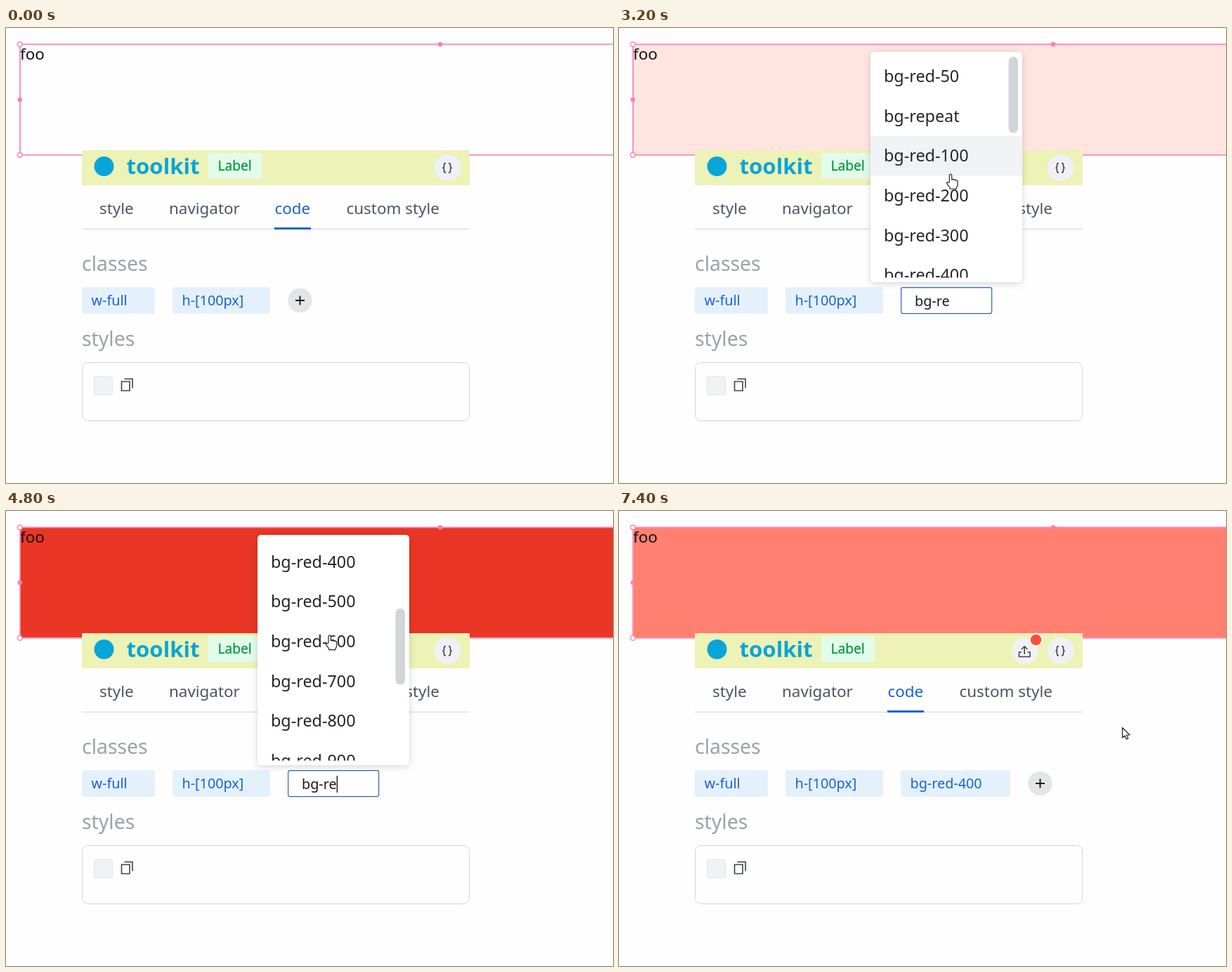
An HTML page for the animation above (7.46 s loop, 864 px wide and 648 px high).

```html
<!DOCTYPE html>
<html lang="en">
<head>
<meta charset="utf-8">
<title>Class editor</title>
<style>
  html, body { margin: 0; width: 100%; height: 100%; overflow: hidden; background: #fefefe; }
  svg { display: block; width: 864px; height: 648px; }
  text { font-family: "Noto Sans", "Open Sans", sans-serif; white-space: pre; }
  .tab { font-size: 22.4px; fill: #4d5566; }
  .head { font-size: 28.4px; fill: #9ca1ab; }
  .chip rect { fill: #e4f1fd; }
  .chip text { font-size: 19.8px; fill: #1762d8; }
  .chip path { stroke: #1762d8; stroke-width: 1.6; }
  .round { fill: #f0f1f4; }
  .icon { fill: none; stroke: #3d424d; stroke-width: 1.6; }
  .item { font-size: 23.35px; fill: #23252b; }
  .cursor { fill: #fff; stroke: #222; stroke-width: 1.2; stroke-linejoin: round; }
  #popup { filter: drop-shadow(0 2px 5px rgba(0, 0, 0, .16)); }
</style>
</head>
<body>
<svg viewBox="0 0 864 648">
  <defs>
    <clipPath id="view"><rect x="358" y="39" width="216" height="316.5"/></clipPath>
    <g id="cross"><path d="M-5.5-5.5 5.5 5.5M5.5-5.5-5.5 5.5"/></g>
    <g id="add">
      <circle r="17.2" fill="#e4e5e9"/>
      <path d="M-6.5 0H6.5M0-6.5V6.5" stroke="#15171b" stroke-width="1.9"/>
    </g>
  </defs>

  <rect id="fill" x="20" y="23" width="860" height="158"/>
  <text x="20" y="45" font-size="22.5" fill="#111">foo</text>
  <rect x="20" y="23.3" width="860" height="157.5" fill="none" stroke="#fb8db9" stroke-width="1.9"/>
  <g fill="#fa7fb0">
    <circle cx="618" cy="23.3" r="3.3"/>
    <circle cx="19.7" cy="102" r="3.3"/>
  </g>
  <g fill="#fff" stroke="#fa86b4" stroke-width="1.5">
    <circle cx="19.7" cy="23.3" r="3.4"/>
    <circle cx="19.7" cy="180.8" r="3.4"/>
  </g>

  <rect x="108" y="174" width="552" height="50" fill="#edf2b6"/>
  <circle cx="139.5" cy="197" r="14" fill="#08a5d8"/>
  <text x="171.5" y="208" font-size="31.2" font-weight="700" fill="#08a5d8">toolkit</text>
  <rect x="288" y="178" width="76" height="37" rx="3" fill="#e3fbea"/>
  <text x="301.5" y="203" font-size="19.1" fill="#0b9a44" stroke="#0b9a44" stroke-width=".3">Label</text>
  <g id="upload">
    <circle class="round" cx="578" cy="199" r="19"/>
    <path class="icon" d="M573 201h-3.5v6.5h15.5V201h-3.5M577.2 204v-11M573 197l4.2-4.2 4.2 4.2"/>
    <circle cx="593.5" cy="183.5" r="10" fill="#fff"/>
    <circle cx="593.5" cy="183.5" r="7.8" fill="#ff4f3c"/>
  </g>
  <circle class="round" cx="628.5" cy="199" r="19"/>
  <path class="icon" d="M626 192.500q-2.500 0-2.500 2.500v2q0 2-2 2.300q2 .3 2 2.300v2q0 2.500 2.500 2.500M630 192.500q2.500 0 2.500 2.500v2q0 2 2 2.300q-2 .3-2 2.300v2q0 2.500-2.500 2.500"/>

  <rect x="108" y="285.600" width="552" height="1.400" fill="#dcdee1"/>
  <text class="tab" x="133" y="264.500">style</text>
  <text class="tab" x="232" y="264.500">navigator</text>
  <text class="tab" x="382.500" y="264.500" style="fill:#1762d8">code</text>
  <text class="tab" x="484.500" y="264.500">custom style</text>
  <rect x="382" y="284" width="52" height="3" fill="#1762d8"/>

  <text class="head" x="108" y="346">classes</text>
  <g id="chips"></g>
  <use id="plus" href="#add"/>
  <g id="field">
    <rect x="401.600" y="369.600" width="129" height="37" rx="2.500" fill="#fff" stroke="#2e66ba" stroke-width="1.200"/>
    <text id="typed" x="421" y="396" font-size="19.8" fill="#17191d"></text>
    <rect id="caret" y="377" width="1.400" height="24" fill="#17191d"/>
  </g>
  <rect id="stub" x="464.300" y="414" width="1.400" height="13" fill="#dcdde0"/>

  <text class="head" x="108" y="453">styles</text>
  <rect x="108.500" y="476.500" width="551" height="83" rx="8" fill="none" stroke="#d3d5da"/>
  <rect x="125.500" y="496.500" width="26" height="26" rx="2" fill="#f1f2f5" stroke="#e3e4e8"/>
  <path class="icon" d="M164.500 503.500h11.500v13h-11.500zM168.500 499.800h11.500v13"/>

  <g id="popup">
    <rect x="358" y="34" width="216" height="328" rx="5" fill="#fff"/>
    <g clip-path="url(#view)"><g id="list">
      <rect id="mark" x="358" width="216" height="56.670" fill="#f1f2f5"/>
    </g></g>
    <rect id="thumb" x="554.500" y="41" width="13.500" height="108.500" rx="6.700" fill="#d1d4d9"/>
  </g>

  <g id="arrow" class="cursor"><path d="M.5.500V15l3.400-3 2.300 5 2.500-1.100-2.300-4.900H11z"/></g>
  <g id="hand" class="cursor"><path d="M-1.700 11V1.500Q0-1.200 1.700 1.500V8q1.800-1.400 3 .4q1.600-1.100 2.800.6q2.300-.8 2.500 1.500v5q-.6 2.500-1.700 4V21H-1v-1.500q-2.500-3-4.500-6.500q.6-2.200 2.300-.800z"/></g>
  <g id="ibeam"><path d="M-3.500-7.500h2.500l1 1 1-1h2.500M-3.500 7.500h2.500l1-1 1 1h2.500M0-6.500v13" fill="none" stroke="#222" stroke-width="1.300"/></g>
</svg>
<script>
const LOOP = 7460, PITCH = 56.67;
const $ = id => document.getElementById(id);
const svg = (tag, attrs, parent, text = '') => {
  const el = document.createElementNS('http://www.w3.org/2000/svg', tag);
  for (const k in attrs) el.setAttribute(k, attrs[k]);
  el.textContent = text;
  parent.append(el);
  return el;
};
const show = (id, on) => { $(id).style.display = on ? '' : 'none'; };
const move = (id, x, y) => $(id).setAttribute('transform', `translate(${x} ${y})`);

function chip(x, w, label) {
  const g = svg('g', { class: 'chip' }, $('chips'));
  svg('rect', { x, y: 369, width: w, height: 38, rx: 3 }, g);
  svg('text', { x: x + 13.5, y: 395 }, g, label);
  svg('use', { href: '#cross', x: x + w - 23.5, y: 388.500 }, g);
  return g;
}
chip(108, 104, 'w-full');
chip(237, 139, 'h-[100px]');
chip(401, 156, 'bg-red-400').id = 'added';

const names = ['red-50', 'repeat'];
for (let n = 100; n < 1000; n += 100) names.push('red-' + n);
names.push('red-950', 'repeat-x', 'repeat-y', 'repeat-round', 'repeat-space');
names.forEach((name, i) =>
  svg('text', { class: 'item', x: 377, y: 77 + PITCH * i }, $('list'), 'bg-' + name));

// Rows are [time, ...values]; step holds a row, tween blends two.
const step = (rows, t) => rows.reduce((hit, row) => row[0] <= t ? row : hit)[1];
function tween(rows, t) {
  const i = rows.findIndex(row => row[0] > t);
  if (i < 1) return rows.at(i).slice(1);
  const a = rows[i - 1], b = rows[i], k = (t - a[0]) / (b[0] - a[0]);
  return a.slice(1).map((v, j) => v + (b[j + 1] - v) * k);
}

const path = [
  [60, 84, 420], [420, 412, 390], [620, 418, 388], [800, 440, 385.5], [2200, 440, 385.5],
  [2460, 452, 340], [2860, 474, 216], [3200, 472, 208], [3660, 469, 203], [3860, 468, 202],
  [3930, 466, 194], [4330, 463, 187], [4600, 462, 184], [5530, 456, 150], [5860, 450, 62],
  [6200, 450, 58], [6600, 570, 240], [6930, 672, 318], [7060, 715, 309], [7400, 716, 308]
];
const pointer = [
  [0, ''], [60, 'arrow'], [400, 'hand'], [620, 'ibeam'], [1730, ''],
  [2200, 'ibeam'], [2330, 'hand'], [6260, 'arrow']
];
const scroll = [
  [0, 0], [3210, 0], [3660, 150], [3860, 156], [3930, 180], [4330, 274],
  [4660, 274], [5400, 303], [LOOP, 303]
];
const typing = [[0, ''], [1130, 'b'], [1270, 'bg'], [1600, 'bg-'], [1730, 'bg-r'], [1860, 'bg-re']];
const hover = [
  [0, -1], [2430, 5], [2560, 4], [2700, 3], [2930, 2], [3330, 3], [3500, 4],
  [3640, 5], [3880, 6], [4160, -1], [5660, 6], [5800, 5]
];
const colors = [
  [0, 'none'], [2430, '#ff8070'], [2560, '#ffa89f'], [2700, '#ffcac4'], [2930, '#ffe4e0'],
  [3330, '#ffcac4'], [3500, '#ffa89f'], [3640, '#ff8070'], [3880, '#ff5744'],
  [4160, '#ea3624'], [5660, '#ff5744'], [5800, '#ff8070']
];

function draw(t) {
  const editing = t >= 600 && t < 6260, done = t >= 6260;
  $('fill').setAttribute('fill', step(colors, t));
  show('field', editing);
  show('plus', !editing);
  move('plus', done ? 599.5 : 418.5, 388);
  show('added', done);
  show('upload', t >= 6400);
  show('stub', t >= 700 && t < 2130);

  const typed = $('typed');
  typed.textContent = step(typing, t);
  const blink = (t + 1060 - 350) % 1060 < 530;
  show('caret', t >= 1130 && (t < 2130 || blink));
  $('caret').setAttribute('x', 421 + (editing ? typed.getComputedTextLength() : 0));

  show('popup', t >= 2130 && t < 6330);
  $('popup').style.opacity = Math.min(1, (t - 2100) / 130, (6400 - t) / 140);
  const [top] = tween(scroll, t), row = step(hover, t);
  move('list', 0, -top);
  move('thumb', 0, top * .35);
  show('mark', row >= 0);
  $('mark').setAttribute('y', 40.5 + PITCH * row);

  const kind = step(pointer, t), [x, y] = tween(path, t);
  for (const id of ['arrow', 'hand', 'ibeam']) {
    show(id, id === kind);
    move(id, x, y);
  }
}

const start = performance.now();
function tick() {
  draw((performance.now() - start) % LOOP);
  requestAnimationFrame(tick);
}
tick();
</script>
</body>
</html>
```
